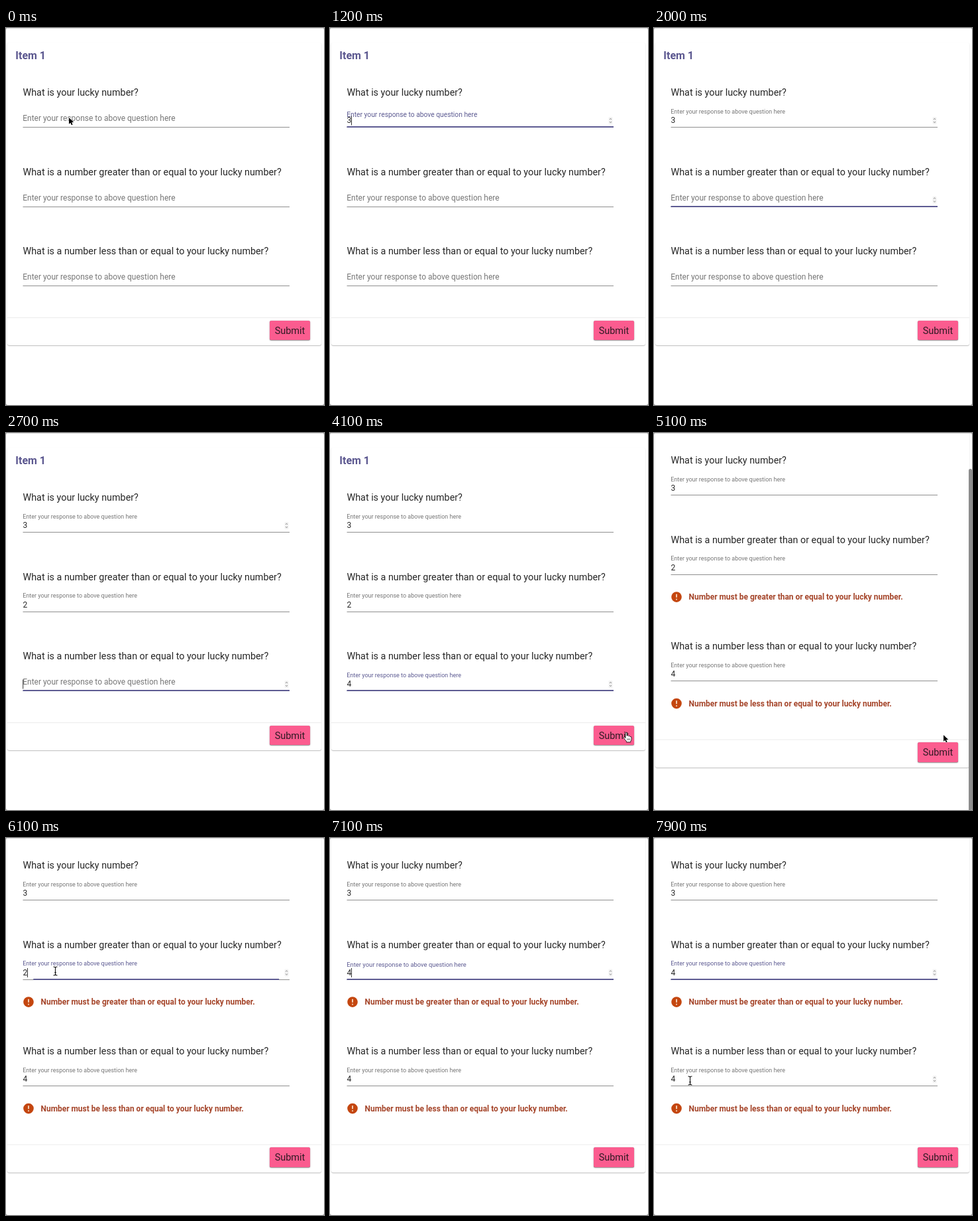
Write an HTML page that moves like this. It is 480 px wide and 568 px high and loops after 8 s.

```html
<!DOCTYPE html>
<html lang="en">
<head>
<meta charset="utf-8">
<title>Lucky number form</title>
<style>
  html, body { margin: 0; width: 100%; height: 100%; overflow: hidden; background: #fff; }
  #stage { position: relative; width: 480px; height: 568px; overflow: hidden; background: #fff; }
  #stage > *, #page > * { position: absolute; }
  #page { left: 0; top: 0; width: 480px; height: 660px; }
  #card {
    left: 2px; top: 22px; width: 474px; border-radius: 3px; background: #fff;
    box-shadow: 0 1px 1px rgba(0,0,0,.17), 0 1px 2px rgba(0,0,0,.11);
  }
  #button {
    left: 398px; width: 61px; height: 29.5px; border-radius: 2.5px; background: #fb5c8f;
    box-shadow: 0 0 1px rgba(80,20,50,.55), 0 1px 1px rgba(0,0,0,.3), 0 1px 3px rgba(0,0,0,.14);
  }
  #bar { left: 475px; width: 5px; height: 514px; border-radius: 2.5px 2.5px 0 0; background: #8d8d8d; }
  #frame { inset: 0; border-radius: 3px; border-top: 1px solid #dcdcdc; box-shadow: 0 0 0 4px #a8a8a8; }
  svg { left: 0; top: 0; overflow: visible; }
  text { font-family: Roboto, sans-serif; fill: #262626; white-space: pre; }
  .title { font-size: 16px; font-weight: 700; fill: #5b578f; }
  .ask { font-size: 14.34px; }
  .label, .value { font-size: 12px; }
  .error { font-size: 11.96px; font-weight: 700; fill: #a5452a; }
  .submit { font-size: 14.5px; text-anchor: middle; fill: #301a24; }
</style>
</head>
<body>
<div id="stage">
  <div id="page">
    <div id="card"></div>
    <div id="button"></div>
    <svg id="form" width="480" height="660"></svg>
  </div>
  <div id="bar"></div>
  <svg id="pointer" width="480" height="568"></svg>
  <div id="frame"></div>
</div>
<script>
const LOOP = 8000, STEP = 100;
const LEFT = 25.5, RIGHT = 428;
const PURPLE = '#5d5b92', GREY = '#777';
const ERRORS_AT = 4400, ERROR_ROOM = 41, SCROLL = 56;
const HINT = 'Enter your response to above question here';

// focus: [from, to]; values: [time, text]
const FIELDS = [
  { ask: 'What is your lucky number?', y: 0,
    focus: [[570, 1440]], values: [[1126, '3']] },
  { ask: 'What is a number greater than or equal to your lucky number?', y: 119.5,
    error: 'Number must be greater than or equal to your lucky number.',
    focus: [[1440, 2420], [5994, LOOP]], values: [[2010, '2'], [6450, ''], [6950, '4']] },
  { ask: 'What is a number less than or equal to your lucky number?', y: 239,
    error: 'Number must be less than or equal to your lucky number.',
    focus: [[2420, 4300]], values: [[3390, '4']] }
];

// time, x, y, shape
const PATH = [
  [0, 95, 135, 'arrow'], [100, 190, 168, 'arrow'], [200, 323, 213, 'beam'],
  [300, 323, 213, 'beam'], [400, 107, 144, 'beam'], [3600, 107, 144, 'beam'],
  [3700, 165, 190, 'arrow'], [3900, 400, 400, 'arrow'], [4000, 456, 455, 'hand'],
  [4100, 447, 451, 'hand'], [4300, 446, 452, 'hand'], [4400, 446, 452, 'arrow'],
  [5100, 437, 455, 'arrow'], [5300, 400, 425, 'arrow'], [5700, 130, 228, 'arrow'],
  [5800, 86, 204, 'beam'], [5900, 74.5, 200.5, 'beam'], [7200, 74.5, 200.5, 'beam'],
  [7400, 67, 285, 'arrow'], [7600, 59, 345, 'arrow'], [7700, 56, 360, 'beam'],
  [7900, 54.5, 365.5, 'beam']
];
const HIDDEN = [[1126, 3600], [6450, 7200]];

const $ = id => document.getElementById(id);
const clamp = v => Math.min(1, Math.max(0, v));
const within = (t, [a, b]) => t >= a && t < b;
const show = (node, on) => node.setAttribute('visibility', on ? 'visible' : 'hidden');

function set(node, attrs) {
  for (const k in attrs) node.setAttribute(k, attrs[k]);
  return node;
}
function add(parent, tag, attrs, text) {
  const node = set(document.createElementNS('http://www.w3.org/2000/svg', tag), attrs);
  if (text) node.textContent = text;
  return parent.appendChild(node);
}

// cubic-bezier(.25, .8, .25, 1)
function ease(p) {
  p = clamp(p);
  let lo = 0, hi = 1, s = .5;
  for (let i = 0; i < 20; i++) {
    s = (lo + hi) / 2;
    const x = .75 * (1 - s) * s + s * s * s;
    if (x < p) lo = s; else hi = s;
  }
  return 2.4 * (1 - s) ** 2 * s + 3 * (1 - s) * s * s + s ** 3;
}
const smooth = p => (p = clamp(p)) * p * (3 - 2 * p);

function buildField(f) {
  const g = f.node = add(form, 'g', {});
  const lineY = Math.round(149 + f.y) - f.y;
  const width = RIGHT - LEFT;
  add(g, 'text', { class: 'ask', x: LEFT, y: 102 }, f.ask);
  add(g, 'rect', { x: LEFT, y: lineY, width, height: 1, fill: '#8f8f8f' });
  f.ripple = add(g, 'rect', { y: lineY - 1, height: 2, fill: PURPLE });
  f.label = add(g, 'text', { class: 'label' }, HINT);
  f.value = add(g, 'text', { class: 'value', x: LEFT, y: 143.3 });
  f.caret = add(g, 'rect', { y: 132.5, width: 1, height: 14, fill: '#333' });
  f.spinner = add(g, 'g', {});
  add(f.spinner, 'rect', { x: 420.5, y: 134, width: 6, height: 11, rx: 1.5, fill: '#f3f3f3' });
  add(f.spinner, 'path', { d: 'M422 138l1.5-1.8 1.5 1.8M422 141l1.5 1.8 1.5-1.8',
    fill: 'none', stroke: '#777', 'stroke-width': .8 });
  if (f.error) {
    f.alert = add(g, 'g', {});
    add(f.alert, 'circle', { cx: 34, cy: 183.6, r: 7.8, fill: '#c4460f' });
    add(f.alert, 'path', { d: 'M34 179.2v5M34 186.2v1.7', stroke: '#fdeedd', 'stroke-width': 1.6 });
    add(f.alert, 'text', { class: 'error', x: 52.5, y: 187.9 }, f.error);
  }
}

function drawField(f, t, shift, mouse) {
  const y = f.y + shift;
  set(f.node, { transform: `translate(0 ${y})` });

  const focus = f.focus.find(span => within(t, span));
  const last = f.values.filter(v => v[0] <= t).pop();
  const text = last ? last[1] : '';
  const moved = last ? ease((t - last[0]) / 400) : 0;
  const up = text ? moved : last ? 1 - moved : 0;

  set(f.label, {
    transform: `translate(${LEFT - .3} ${140 - 11.3 * up}) scale(${1 - .25 * up})`
  });
  f.label.style.fill = focus && text ? PURPLE : GREY;
  f.value.textContent = text;

  show(f.ripple, focus);
  show(f.caret, false);
  if (focus) {
    const age = t - focus[0];
    const width = (RIGHT - LEFT) * (.5 + .5 * ease(age / 300));
    set(f.ripple, { x: (LEFT + RIGHT - width) / 2, width, opacity: clamp(age / 100) });
    const since = Math.max(focus[0], last ? last[0] : 0);
    set(f.caret, { x: text ? 32 : 25.2 });
    show(f.caret, (t - since) % 1060 < 530);
  }
  const top = y - scrollAt(t);
  const hover = mouse.shape === 'beam' && mouse.x > LEFT && mouse.x < RIGHT &&
    mouse.y > top + 128 && mouse.y < top + 152;
  show(f.spinner, focus || hover);
  if (f.alert) show(f.alert, t >= ERRORS_AT);
}

const scrollAt = t => SCROLL * smooth((t - 4500) / 500);

function mouseAt(t) {
  let i = PATH.length - 1;
  while (PATH[i][0] > t) i--;
  const a = PATH[i], b = PATH[i + 1] || a;
  const p = b === a ? 0 : (t - a[0]) / (b[0] - a[0]);
  return { x: a[1] + (b[1] - a[1]) * p, y: a[2] + (b[2] - a[2]) * p, shape: a[3] };
}

const form = $('form');
add(form, 'text', { class: 'title', x: 14.3, y: 47.3 }, 'Item 1');
FIELDS.forEach(buildField);
const footer = add(form, 'g', {});
add(footer, 'rect', { x: 2, y: 436, width: 474, height: 1, fill: '#ececec' });
add(footer, 'text', { class: 'submit', x: 428.5, y: 460.6 }, 'Submit');

const shapes = {};
const ink = (name, attrs) => add(shapes[name], 'path', attrs);
for (const name of ['arrow', 'beam', 'hand']) shapes[name] = add($('pointer'), 'g', {});
ink('arrow', { d: 'M0 0V9.8L2.3 7.7 3.9 11.3 5.6 10.6 4.1 7.1H7.2Z',
  fill: '#000', stroke: '#fff', 'stroke-width': .9, 'paint-order': 'stroke' });
const beam = 'M-3-6.5Q0-6.5 0-4.8Q0-6.5 3-6.5M0-5V5M-3 6.5Q0 6.5 0 4.8Q0 6.5 3 6.5M-1.4 2.2H1.4';
ink('beam', { d: beam, fill: 'none', stroke: '#fff', 'stroke-width': 2.4, opacity: .7 });
ink('beam', { d: beam, fill: 'none', stroke: '#111', 'stroke-width': 1.1 });
ink('hand', {
  d: 'M-1 8V1.2Q-1 0 0 0T1.2 1.2V5Q3.4 4 3.8 5.6Q5.6 4.8 6 6.4Q8 6 8 8V10.4' +
    'Q8 12.3 6.8 13.2V14.8H.4V13.4Q-1 12-3.6 8.6Q-4 7-2.6 7T-1 8.6Z',
  fill: '#fff', stroke: '#111', 'stroke-width': .9, 'stroke-linejoin': 'round' });
ink('hand', { d: 'M1.8 9.2V12M3.6 9.2V12M5.4 9.2V12', stroke: '#111', 'stroke-width': .6 });

function draw(t) {
  const grown = t >= ERRORS_AT;
  const scroll = scrollAt(t);
  const extra = grown ? 2 * ERROR_ROOM - .5 : 0;
  const mouse = mouseAt(t);

  $('page').style.transform = `translateY(${-scroll}px)`;
  $('card').style.height = 456 + extra + 'px';
  $('button').style.top = 440.8 + extra + 'px';
  set(footer, { transform: `translate(0 ${extra})` });
  FIELDS.forEach((f, i) => drawField(f, t, grown && i === 2 ? ERROR_ROOM : 0, mouse));

  $('bar').style.top = 54 * scroll / SCROLL + 'px';
  $('bar').style.opacity = t < 4500 ? 0 : 1 - clamp((t - 5400) / 400);

  const hidden = HIDDEN.some(span => within(t, span));
  for (const name in shapes) show(shapes[name], !hidden && name === mouse.shape);
  set(shapes[mouse.shape], { transform: `translate(${mouse.x} ${mouse.y})` });
}

const start = performance.now();
function tick() {
  const t = (performance.now() - start) % LOOP;
  draw(Math.floor(t / STEP) * STEP);
  requestAnimationFrame(tick);
}
tick();
</script>
</body>
</html>
```
